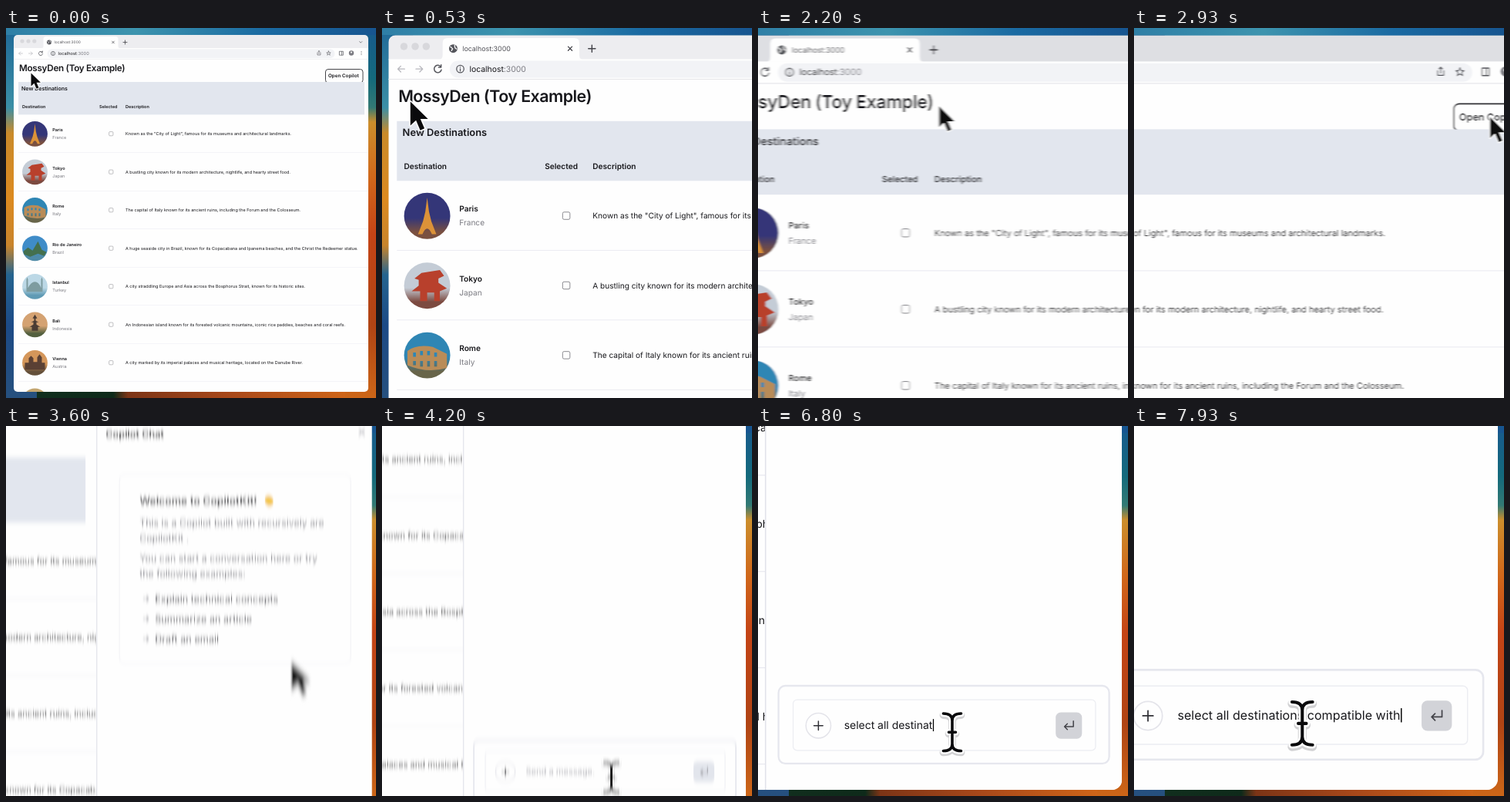
An HTML page that plays this animation: 480x480 px, repeating every 8 s.

```html
<!DOCTYPE html>
<html lang="en">
<head>
<meta charset="utf-8">
<title>Travel demo</title>
<style>
  html, body { margin: 0; width: 100%; height: 100%; overflow: hidden; background: #1d4a7c; }
  svg { display: block; width: 100vw; height: 100vh; }
  text { font-family: Inter, "Liberation Sans", sans-serif; white-space: pre; text-rendering: geometricPrecision; }
</style>
</head>
<body>
<svg id="stage" viewBox="0 0 480 480" preserveAspectRatio="xMidYMid slice"></svg>
<script>
const LOOP = 8000;
const PAPER = '#fefefe', INK = '#18181c', GREY = '#7b7b82', ICON = '#55565c', LINE = '#e9e9f0';
const stage = document.getElementById('stage');

function set(node, attrs) {
  for (const k in attrs) node.setAttribute(k, attrs[k]);
}
function add(parent, tag, attrs = {}, content) {
  const node = document.createElementNS('http://www.w3.org/2000/svg', tag);
  set(node, attrs);
  if (content !== undefined) node.textContent = content;
  parent.appendChild(node);
  return node;
}
const rect = (p, x, y, width, height, fill, more) => add(p, 'rect', { x, y, width, height, fill, ...more });
const circle = (p, cx, cy, r, fill, more) => add(p, 'circle', { cx, cy, r, fill, ...more });
const stroke = (p, d, color, width = 0.8, more) =>
  add(p, 'path', { d, fill: 'none', stroke: color, 'stroke-width': width, 'stroke-linecap': 'round', 'stroke-linejoin': 'round', ...more });
// Text placed by the middle of its capitals
const label = (p, x, cy, size, str, fill = INK, weight = 400, more) =>
  add(p, 'text', { x, y: cy + size * 0.36, 'font-size': size, fill, 'font-weight': weight, ...more }, str);

const defs = add(stage, 'defs');
function gradient(id, stops, vertical = true) {
  const g = add(defs, 'linearGradient', { id, x1: 0, y1: 0, x2: vertical ? 0 : 1, y2: vertical ? 1 : 0 });
  stops.forEach(([offset, color]) => add(g, 'stop', { offset, 'stop-color': color }));
  return `url(#${id})`;
}
// A group with a directional blur that follows its speed
function blurGroup(id) {
  const filter = add(defs, 'filter', { id, filterUnits: 'userSpaceOnUse', x: -30, y: -30, width: 540, height: 540 });
  const blur = add(filter, 'feGaussianBlur', { stdDeviation: '0 0' });
  const group = add(stage, 'g');
  const smear = (x, y) => {
    set(blur, { stdDeviation: `${x} ${y}` });
    if (x + y > 0.3) set(group, { filter: `url(#${id})` });
    else group.removeAttribute('filter');
  };
  return { world: add(group, 'g'), smear };
}

// Desktop: only its rim ever shows, and it stays still
const topFill = gradient('top', [[0, '#2f7fa6'], [0.35, '#3d94ae'], [0.7, '#1a6aa2'], [1, '#175590']], false);
const bottomFill = gradient('bottom', [[0, '#12301f'], [0.29, '#0e2a1a'], [0.33, '#7c3416'], [0.6, '#a8481a'], [1, '#d86c18']], false);
const leftFill = gradient('left', [[0, '#226c98'], [0.2, '#3b8fa6'], [0.27, '#c98a2a'], [0.45, '#dc8a20'], [0.58, '#c8842c'], [0.66, '#25648f'], [0.8, '#1c4a86'], [1, '#26507e']]);
const rightFill = gradient('right', [[0, '#175c8c'], [0.12, '#146a7c'], [0.2, '#337a74'], [0.24, '#cc8e2c'], [0.4, '#d0661a'], [0.55, '#c44416'], [0.8, '#b04414'], [1, '#cc6618']]);
rect(stage, 0, 0, 480, 40, topFill);
rect(stage, 0, 440, 480, 40, bottomFill);
rect(stage, 0, 9, 40, 471, leftFill);
rect(stage, 440, 9, 40, 471, rightFill);

const clip = add(defs, 'clipPath', { id: 'frame' });
rect(clip, 10, 9, 460, 463, '#000', { rx: 5 });
const scene = blurGroup('pan');
const win = add(scene.world, 'g', { 'clip-path': 'url(#frame)' });

// Browser frame
const strip = rect(win, 10, 9, 460, 17.5, '#dedfe3');
const lights = [['#f0604e', 21], ['#f2b932', 29], ['#3fbe45', 36.8]].map(([c, x]) => [circle(win, x, 17, 2.6, c), c]);
add(win, 'path', { d: 'M45 26.5Q48.5 26.5 48.5 23V14.5Q48.5 11 52 11H142Q145.5 11 145.5 14.5V23Q145.5 26.5 149 26.5Z', fill: PAPER });
circle(win, 56, 18.5, 3, ICON);
stroke(win, 'M54 17.2L55.6 18.6L54.8 20M57 16.3L57.3 18L58.4 18.8', PAPER, 0.7);
label(win, 62.5, 18.5, 4.85, 'localhost:3000', '#505056');
stroke(win, 'M137.6 17.1L140.4 19.9M140.4 17.1L137.6 19.9', '#44444a', 0.7);
stroke(win, 'M152 18.5H157M154.5 16V21', '#44444a', 0.8);
stroke(win, 'M458.6 17.6L460.2 19.2L461.8 17.6', ICON, 0.7);
rect(win, 10, 26, 460, 14.5, PAPER);
rect(win, 53.5, 27.2, 373, 12, '#f2f3f6', { rx: 6 });
stroke(win, 'M21.5 33H16.7M18.8 30.9L16.7 33L18.8 35.1M29.5 33H34.3M32.2 30.9L34.3 33L32.2 35.1', '#b8b8be', 0.7);
stroke(win, 'M47 31.2A2.6 2.6 0 1 0 47.6 33.6M47.4 30V31.8H45.6', ICON, 0.8);
circle(win, 61, 33, 2.6, 'none', { stroke: ICON, 'stroke-width': 0.7 });
stroke(win, 'M61 32.8V34.4M61 31.6V31.7', ICON, 0.7);
const url = label(win, 67.5, 33, 5.7, 'localhost', INK);
add(url, 'tspan', { fill: GREY }, ':3000');
stroke(win, 'M404 32V35H408V32M406 33.5V29.6M404.8 30.8L406 29.6L407.2 30.8', ICON, 0.6);
stroke(win, 'M418.5 30L419.3 32H421.2L419.7 33.2L420.3 35.2L418.5 34L416.7 35.2L417.3 33.2L415.8 32H417.7Z', ICON, 0.6);
stroke(win, 'M432.8 30.3H437.4V35.2H432.8ZM435.6 30.5V35', ICON, 0.7);
circle(win, 448, 32.5, 3.2, GREY);
circle(win, 448, 31.6, 1.1, PAPER);
[30.5, 32.5, 34.5].forEach(y => circle(win, 461, y, 0.55, ICON));

// Page
rect(win, 10, 40, 460, 432, PAPER);
rect(win, 10, 40, 460, 0.5, '#e2e2e6');
const picked = rect(win, 17, 45.5, 10.8, 13.5, '#b9d6ec');
label(win, 17, 52, 11.7, 'MossyDen (Toy Example)', INK, 600, { 'letter-spacing': -0.28 });
rect(win, 414.5, 53.5, 48.5, 17.5, PAPER, { rx: 3.5, stroke: '#303036', 'stroke-width': 0.9 });
label(win, 418, 62.2, 6.3, 'Open Copilot', INK, 600);
const header = rect(win, 16, 70, 449, 42.4, '#e2e6ee');
label(win, 20, 78, 7.08, 'New Destinations', INK, 600);
[[21, 'Destination'], [121, 'Selected'], [155, 'Description']].forEach(([x, s]) => label(win, x, 102.3, 5.54, s, INK, 600));

// name, country, description, sky, ground, landmark colour, landmark outline
const places = [
  ['Paris', 'France', 'Known as the "City of Light", famous for its museums and architectural landmarks.', '#343678', '#7a5040', '#dc9238', 'M0-13L1.3-3L3 4L6.5 13H3.4Q0 5-3.4 13H-6.5L-3 4L-1.3-3Z'],
  ['Tokyo', 'Japan', 'A bustling city known for its modern architecture, nightlife, and hearty street food.', '#c4ccd6', '#7c4a40', '#b8402c', 'M-4-9L9-11L12-7L8-5V-2L14 2L9 4V11H5V5H0V11H-5V4H-11L-6 0V-4L-9-5Z'],
  ['Rome', 'Italy', 'The capital of Italy known for its ancient ruins, including the Forum and the Colosseum.', '#2f86b4', '#68654a', '#b98c58', 'M-14-3Q-8-8 4-6L14-1V9Q0 13-14 7ZM-10-2h2v3h-2zM-5-3h2v3h-2zM0-3h2v3h-2zM5-2h2v3h-2zM-10 4h2v3h-2zM-5 4h2v4h-2zM0 4h2v4h-2zM5 4h2v4h-2z'],
  ['Rio de Janeiro', 'Brazil', 'A huge seaside city in Brazil, known for its Copacabana and Ipanema beaches, and the Christ the Redeemer statue.', '#3f8cc8', '#4f8aa6', '#44704e', 'M-15 4L-9-1L-3 3L4-9L9 2L15 5L12 10L4 7L-6 11L-14 8Z'],
  ['Istanbul', 'Turkey', 'A city straddling Europe and Asia across the Bosphorus Strait, known for its historic sites.', '#bcd8e6', '#5f9ab4', '#7e9ca0', 'M-11 7V-9L-10-12L-9-9V2Q-5-6 0-6T8 2V-9L9-12L10-9V7Z'],
  ['Bali', 'Indonesia', 'An Indonesian island known for its forested volcanic mountains, iconic rice paddies, beaches and coral reefs.', '#d4a272', '#53603f', '#4a3c34', 'M0-13L3-8H1V-5L5-3H2V0L7 3H4V8H-4V3H-7L-2 0V-3H-5L-1-5V-8H-3Z'],
  ['Vienna', 'Austria', 'A city marked by its imperial palaces and musical heritage, located on the Danube River.', '#d4965a', '#64503a', '#5a4034', 'M-13 9V0H-8V-6L-5-9L-2-6V-1H3V-7L6-11L9-7V0H13V9Z'],
  ['', '', '', '#c4a670', '#50603c', '#4c4a34', 'M0-12L9 8H-9Z']
];
const PITCH = 49.5;
places.forEach(([name, country, about, sky, ground, tone, shape], i) => {
  const y = 137.3 + i * PITCH;
  const fill = gradient('sky' + i, [[0, sky], [0.55, sky], [0.85, ground], [1, ground]]);
  circle(win, 37.5, y, 16.4, fill);
  add(win, 'path', { d: shape, fill: tone, 'fill-rule': 'evenodd', transform: `translate(37.5 ${y})` });
  if (!name) return;
  label(win, 60.3, y - 4.9, 5.54, name, INK, 600);
  label(win, 60.3, y + 4.9, 5.54, country, GREY);
  rect(win, 133.7, y - 2.7, 5.2, 5.2, PAPER, { rx: 1, stroke: '#808086', 'stroke-width': 0.5 });
  label(win, 155, y, 5.54, about);
  rect(win, 16, y + 24.2, 454, 0.5, LINE);
});

// Chat panel, drawn from its own left edge
const panel = add(win, 'g');
rect(panel, 0, 40.5, 190, 432, PAPER);
rect(panel, 0, 40.5, 0.6, 432, '#e2e3ea');
label(panel, 6, 55, 6.35, 'Copilot Chat', INK, 600);
stroke(panel, 'M170.4 51.6L174 55.4M174 51.6L170.4 55.4', '#a8a8b0', 0.7);
rect(panel, 15, 81, 150, 123, 'none', { rx: 4, stroke: '#f0f0f4', 'stroke-width': 0.5 });
label(panel, 28, 98.2, 6.9, 'Welcome to CopilotKit!', '#303036', 600);
add(panel, 'ellipse', { cx: 112, cy: 98.2, rx: 2.7, ry: 3.4, fill: '#f3c440', transform: 'rotate(-20 112 98)' });
[[112.3, 'This is a Copilot built with recursively are'], [122.3, 'CopilotKit .'],
 [135.3, 'You can start a conversation here or try'], [145.3, 'the following examples:']]
  .forEach(([y, s]) => label(panel, 28, y, 6.2, s, '#74747c'));
['Explain technical concepts', 'Summarize an article', 'Draft an email'].forEach((s, i) => {
  const y = 161.7 + i * 13;
  stroke(panel, `M30.5 ${y}H34M32.7 ${y - 1.4}L34 ${y}L32.7 ${y + 1.4}`, '#92929a', 0.6);
  label(panel, 38, y, 6.35, s, '#3c3c44');
});
rect(panel, 7, 418.5, 170, 40, PAPER, { rx: 3.5, stroke: '#e6e7ee', 'stroke-width': 0.9 });
rect(panel, 14.5, 425.7, 155.5, 26, PAPER, { rx: 2, stroke: '#ecedf2', 'stroke-width': 0.5 });
circle(panel, 27.5, 439, 6.4, PAPER, { stroke: '#e4e4ea', 'stroke-width': 0.6 });
stroke(panel, 'M25.2 439H29.8M27.5 436.7V441.3', '#303036', 0.6);
const send = rect(panel, 149.5, 432.2, 13.5, 13.5, '#e2e5ec', { rx: 2.6 });
const enter = stroke(panel, 'M158.6 436.6V439.5H154M155.5 438L154 439.5L155.5 441', '#88888e', 0.6);
const hint = label(panel, 40.7, 438.8, 5.54, 'Send a message.', '#a0a0a8');
const typed = label(panel, 40.7, 438.8, 5.54, '');
const caret = rect(panel, 0, 435.6, 0.5, 6.3, '#000');

// Pointer
const overlay = blurGroup('swipe');
const pointer = add(overlay.world, 'g');
const arrow = add(pointer, 'path', {
  d: 'M0 0V17L4 13.3L7 20.3L10 19L7.1 12.3H12.5Z',
  fill: '#0a0a0c', stroke: '#fff', 'stroke-width': 1.8, 'paint-order': 'stroke', 'stroke-linejoin': 'round'
});
const beam = add(pointer, 'g');
const beamPath = 'M-4.6-9.6Q0-9.6 0-6Q0-9.6 4.6-9.6M0-6V6M-4.6 9.6Q0 9.6 0 6Q0 9.6 4.6 9.6M-1.8 0H1.8';
stroke(beam, beamPath, '#66666e', 3.8, { opacity: 0.3, transform: 'translate(0 .8)' });
stroke(beam, beamPath, '#fff', 3.2);
stroke(beam, beamPath, '#0a0a0c', 1.4);

// Monotone cubic through [time, value] points
function track(keys) {
  const last = keys.length - 1;
  const slope = i => (keys[i + 1][1] - keys[i][1]) / (keys[i + 1][0] - keys[i][0]);
  const tangents = keys.map((_, i) => {
    if (i === 0 || i === last) return 0;
    const a = slope(i - 1), b = slope(i);
    return a * b <= 0 ? 0 : 2 * a * b / (a + b);
  });
  return t => {
    if (t <= keys[0][0]) return keys[0][1];
    if (t >= keys[last][0]) return keys[last][1];
    const i = keys.findIndex(k => k[0] > t) - 1;
    const [t0, a] = keys[i], [t1, b] = keys[i + 1], d = t1 - t0, u = (t - t0) / d;
    return a + (b - a) * u * u * (3 - 2 * u) + d * u * (1 - u) * (tangents[i] * (1 - u) - tangents[i + 1] * u);
  };
}
// Critically damped spring from 0 to 1
function spring(t, start, rate) {
  const u = Math.max(0, t - start) / 1000 * rate;
  return 1 - Math.exp(-u) * (1 + u);
}

const viewX = track([[1300, 126], [2200, 160.5], [2900, 325], [3600, 352.7], [3850, 354]]);
const viewY = track([[3150, 124.3], [3600, 169.5], [4000, 300], [4450, 356]]);
const pointX = track([[150, 32.5], [900, 19], [1300, 19], [2050, 158], [2300, 158], [2850, 438], [3200, 438], [3600, 418], [4200, 382.8]]);
const pointY = track([[150, 58.5], [900, 54], [2050, 55], [2300, 55], [2850, 62], [3300, 62], [3600, 203], [4150, 442.4]]);
const press = track([[800, 1], [950, 0.8], [2250, 0.8], [2400, 1], [2800, 1], [2920, 0.8], [3050, 1], [4600, 1], [4700, 0.8], [4820, 1]]);

const MESSAGE = 'select all destinations compatible with ';
const KEY_MS = 54, TYPE_START = 5800, PANEL_START = 2950, SMEAR = 20;
const show = (node, on) => node.setAttribute('visibility', on ? 'visible' : 'hidden');
const speed = (f, t) => (f(t + 8) - f(t - 8)) / 16;

function draw(t) {
  const zoomIn = spring(t, 0, 6), zoomMore = spring(t, 5924, 2);
  const s = 1 + zoomIn + zoomMore;
  const tx = zoomMore ? 472 - 470 * s : zoomIn * (240 - 2 * viewX(t));
  const ty = zoomMore ? 472 - 472 * s : zoomIn * (240 - 2 * viewY(t));
  [scene, overlay].forEach(({ world }) => set(world, { transform: `translate(${tx} ${ty}) scale(${s})` }));

  const vx = speed(viewX, t), vy = speed(viewY, t);
  scene.smear(Math.abs(vx) * SMEAR, Math.abs(vy) * SMEAR);
  overlay.smear(Math.abs(speed(pointX, t) - vx) * SMEAR, Math.abs(speed(pointY, t) - vy) * SMEAR);

  const active = t > 880;
  set(strip, { fill: active ? '#dedfe3' : '#ededf0' });
  lights.forEach(([dot, color]) => set(dot, { fill: active ? color : '#d8d8dc' }));
  show(picked, t > 1000 && t < 1500);

  const left = 472 - 185.5 * spring(t, PANEL_START, 8.5);
  set(panel, { transform: `translate(${left} 0)` });
  set(header, { width: left - 23 });

  const count = Math.max(0, Math.min(MESSAGE.length, Math.floor((t - TYPE_START) / KEY_MS + 0.5)));
  typed.textContent = MESSAGE.slice(0, count);
  show(hint, !count);
  set(send, { fill: count ? '#d2d3d8' : '#e2e5ec' });
  set(enter, { stroke: count ? '#44444a' : '#88888e' });
  set(caret, { x: 40.9 + (count ? typed.getComputedTextLength() : 0) });
  show(caret, t > 5250);

  const overText = (t > 850 && t < 2000) || t > 4150;
  show(arrow, !overText);
  show(beam, overText);
  set(pointer, { transform: `translate(${pointX(t)} ${pointY(t)}) scale(${press(t)})` });
}

const begin = performance.now();
function tick() {
  draw((performance.now() - begin) % LOOP);
  requestAnimationFrame(tick);
}
draw(0);
tick();
</script>
</body>
</html>
```
